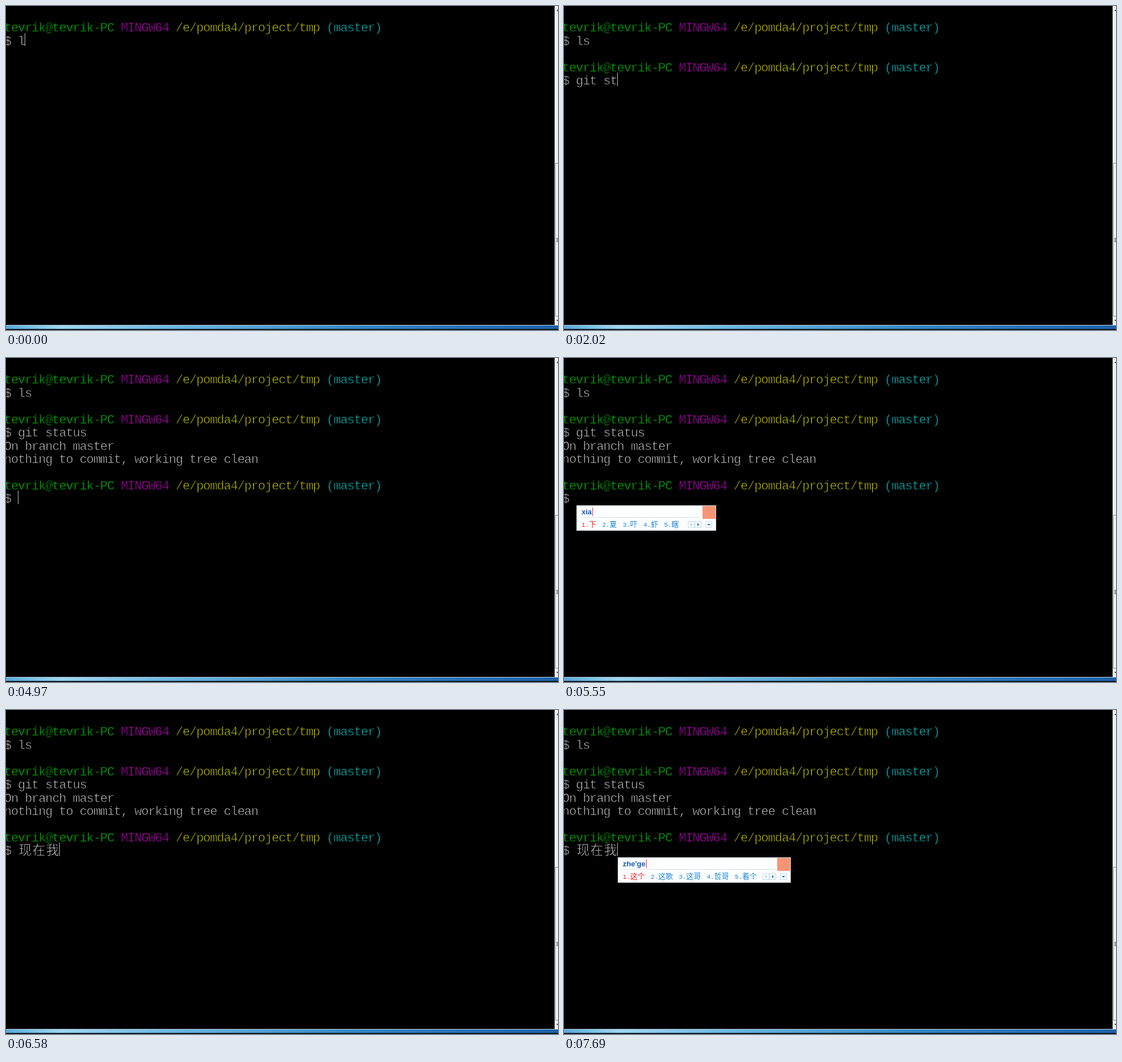
Recreate the animation shown at these times as an HTML page with a canvas. Size 976 px wide and 574 px high, loop 8000 ms.

```html
<!DOCTYPE html>
<html lang="en">
<head>
<meta charset="utf-8">
<title>Terminal session</title>
<style>
html, body { margin: 0; width: 976px; height: 574px; overflow: hidden; background: #000; }
canvas { display: block; }
</style>
</head>
<body>
<canvas id="stage" width="976" height="574"></canvas>
<script>
const ctx = document.getElementById('stage').getContext('2d');
const LOOP = 8000, CELL = 12.13, LEFT = -2.7;
const MONO = '"Liberation Mono", monospace';
const HAN = '"Noto Sans CJK SC", "Noto Sans CJK", sans-serif';
const GREY = '#bfbfbf';

const PROMPT = [
  ['tevrik@tevrik-PC ', '#00bf00'],
  ['MINGW64 ', '#bf00bf'],
  ['/e/pomda4/project/tmp ', '#bfbf00'],
  ['(master)', '#00bfbf']
];

// Input method states: time, pinyin (empty once committed), candidates
const IME = [
  [5250, 'x', '下 小 想 新 像'],
  [5385, 'xi', '系 西 喜 洗 细'],
  [5520, 'xia', '下 夏 吓 虾 瞎'],
  [5655, 'xian', '先 现 线 县 限'],
  [5790, "xian'z", '现在 限制 现状 先知 县长'],
  [5925, "xian'zai", '现在 先在 现 先 线'],
  [6060, ''],
  [6180, 'w', '我 为 无 问 玩'],
  [6300, 'wo', '我 窝 握 卧 沃'],
  [6580, ''],
  [6830, 'z', '在 中 这 做 最'],
  [6980, 'zh', '这 中 只 之 找'],
  [7130, 'zhe', '这 这个 着 者 这样'],
  [7690, "zhe'ge", '这个 这歌 这哥 哲哥 着个']
];
const CURSOR_OFF = [[3290, 3850], [4440, 4970], [5520, 6060], [7130, 7690]];

const rowTop = row => 24.4 + 23.45 * row;
const isHan = ch => ch > '\u2e80';
const typed = (text, t, start, step) =>
  text.slice(0, Math.max(0, Math.floor((t - start) / step) + 1));

function rect(x, y, w, h, color) {
  ctx.fillStyle = color;
  ctx.fillRect(x, y, w, h);
}

function frame(x, y, w, h, color) {
  ctx.strokeStyle = color;
  ctx.lineWidth = 1;
  ctx.strokeRect(x + 0.5, y + 0.5, w - 1, h - 1);
}

// Arrowhead with its tip at x, y, pointing along dx, dy
function arrow(x, y, dx, dy, color) {
  ctx.fillStyle = color;
  ctx.beginPath();
  ctx.moveTo(x, y);
  ctx.lineTo(x - 3 * (dx + dy), y - 3 * (dy + dx));
  ctx.lineTo(x - 3 * (dx - dy), y - 3 * (dy - dx));
  ctx.fill();
}

function label(text, x, y, font, color) {
  ctx.font = font;
  ctx.fillStyle = color;
  ctx.textAlign = 'left';
  ctx.fillText(text, x, y);
}

// Writes on the character grid and returns the next free column.
// A black outline trims the glyphs to a lighter weight.
function write(text, row, col = 0, color = GREY) {
  ctx.fillStyle = color;
  ctx.strokeStyle = '#000';
  ctx.lineWidth = 0.6;
  ctx.lineJoin = 'round';
  ctx.textAlign = 'center';
  for (const ch of text) {
    const span = isHan(ch) ? 2 : 1;
    const x = LEFT + (col + span / 2) * CELL, y = rowTop(row) + 21;
    ctx.font = span === 2 ? '300 23px ' + HAN : '22px ' + MONO;
    ctx.fillText(ch, x, y);
    ctx.strokeText(ch, x, y);
    col += span;
  }
  return col;
}

function prompt(row, input) {
  let col = 0;
  for (const [text, color] of PROMPT) col = write(text, row, col, color);
  return [row + 1, write('$ ' + input, row + 1)];
}

function popup(left, pinyin, list) {
  const words = list.split(' ');
  const start = left + 9;
  const itemWidth = word => 23.5 + 13 * word.length;
  const total = words.reduce((sum, word) => sum + itemWidth(word), 0);
  const width = Math.max(247, Math.round(total + 58.5));
  const right = left + width;

  rect(left, 261, width, 45, '#fdfeff');
  frame(left, 261, width, 45, '#d3dde3');
  rect(start, 282, width - 35, 1, '#d2e5ec');
  rect(right - 24, 262, 23, 23, '#f79475');

  label(pinyin, start, 277, 'bold 13px "Liberation Sans", sans-serif', '#1459b8');
  rect(Math.round(start + ctx.measureText(pinyin).width) + 1, 265, 1, 15, '#ff2020');

  let x = start;
  words.forEach((word, i) => {
    const color = i ? '#1683d8' : '#f01c1c';
    label(i + 1 + '.', x, 299, '11px ' + MONO, color);
    label(word, x + 13, 299, '13px ' + HAN, color);
    x += itemWidth(word);
  });

  for (const offset of [50, 38, 19]) frame(right - offset, 289, 12, 12, '#bddcf2');
  arrow(right - 46, 295, -1, 0, '#9fc9e8');
  arrow(right - 30, 295, 1, 0, '#0872cc');
  arrow(right - 13, 297, 0, 1, '#0872cc');
}

function windowEdge() {
  rect(970, 0, 6, 565, '#f0f0f0');
  rect(971, 278, 5, 272, '#8f8f8f');
  rect(972, 279, 4, 270, '#f4f4f4');
  for (let y = 411; y < 418; y += 2) rect(973, y, 3, 1, '#555');
  arrow(976, 6, 0, -1, '#444');
  arrow(976, 559, 0, 1, '#444');

  const blue = ctx.createLinearGradient(0, 0, 976, 0);
  blue.addColorStop(0, '#58a9d8');
  blue.addColorStop(0.1, '#9ed5f1');
  blue.addColorStop(0.3, '#6bb5e0');
  blue.addColorStop(0.65, '#3683c2');
  blue.addColorStop(1, '#1d62a8');
  rect(0, 565, 976, 1, '#b9d3e4');
  rect(0, 566, 976, 6, blue);
  rect(0, 572, 976, 2, '#0b1a24');
}

function draw(t) {
  rect(0, 0, 976, 574, '#000');

  let cursor = prompt(0, t < 120 ? 'l' : 'ls');
  if (t >= 400) cursor = [2, 0];
  if (t >= 550) {
    const command = typed('git st', t, 1080, 188) + typed('atus', t, 2180, 130);
    cursor = prompt(3, command);
  }
  if (t >= 2700) cursor = [5, 0];

  if (t >= 2830) {
    write('On branch master', 5);
    write('nothing to commit, working tree clean', 6);
    const input = t >= 6580 ? '现在我' : t >= 6060 ? '现在' : '';
    cursor = prompt(8, input);
  }

  const [row, col] = cursor;
  const x = Math.floor(LEFT + col * CELL);
  if (!CURSOR_OFF.some(([from, to]) => t >= from && t < to))
    rect(x, Math.round(rowTop(row)), 1, row === 1 ? 23 : 24, GREY);

  const state = IME.filter(([time]) => t >= time).pop();
  if (state && state[1]) popup(x + 1, state[1], state[2]);

  windowEdge();
}

const begin = performance.now();
function tick() {
  draw((performance.now() - begin) % LOOP);
  requestAnimationFrame(tick);
}
tick();
</script>
</body>
</html>
```
